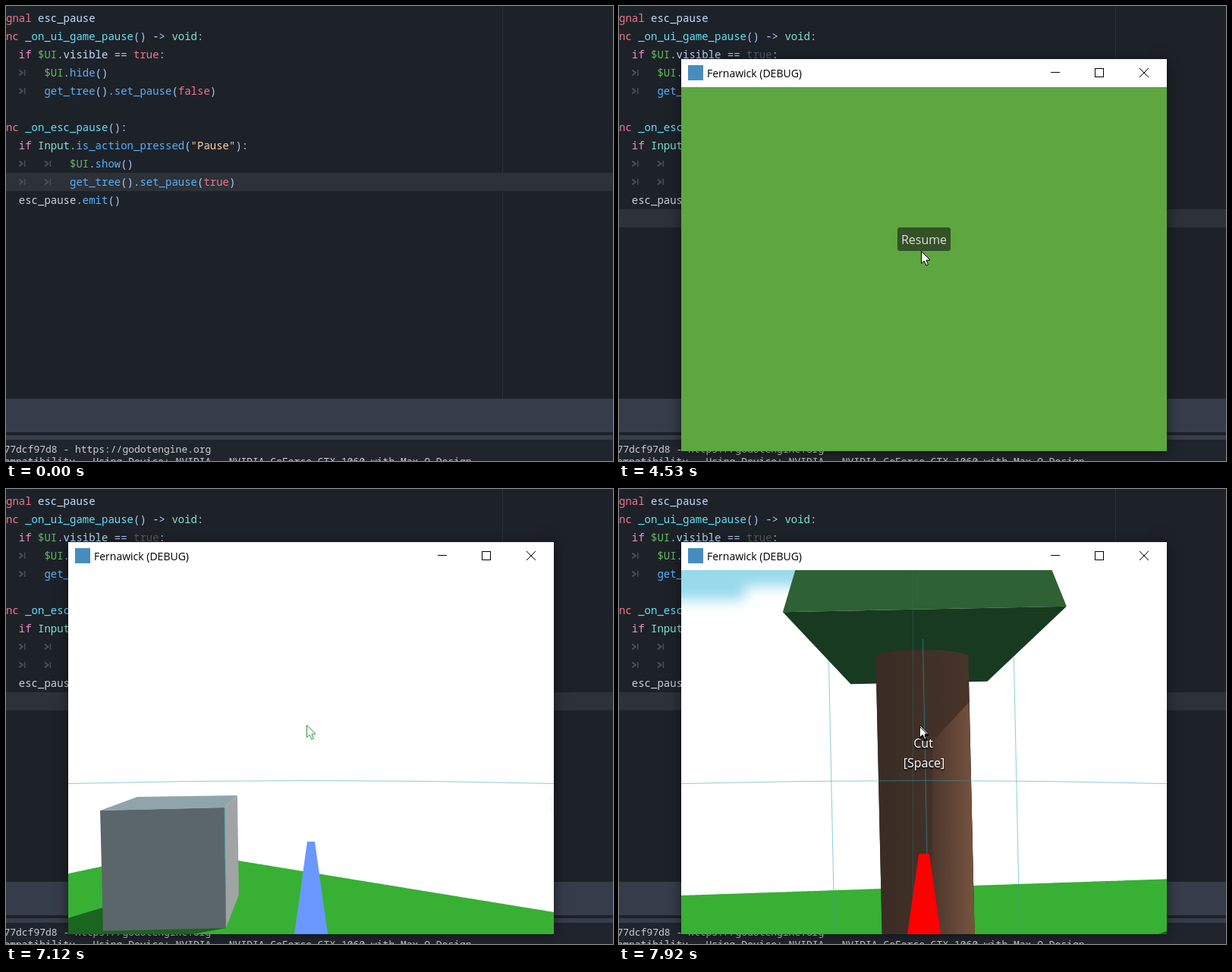
Animation of 800 by 600 pixels, one loop 8000 ms. Source, as an HTML page with a canvas:

```html
<!DOCTYPE html>
<html>
<head>
<meta charset="utf-8">
<style>
html, body { margin: 0; width: 100%; height: 100%; overflow: hidden; background: #1d2229; }
canvas { display: block; }
</style>
</head>
<body>
<canvas id="stage" width="800" height="600"></canvas>
<script>
const ctx = document.getElementById('stage').getContext('2d');
const LOOP = 8000, RUN = 2770, READY = 3500, PLAY = 5480, SPIN = 6650;
const MONO = '"Noto Sans Mono", monospace', SANS = '"Open Sans", sans-serif';

const ink = {
  r: '#f2748a', c: '#f48cc4', f: '#66e0f8', k: '#57b0fa', g: '#63b95c',
  w: '#cdcfd2', s: '#abc9f5', m: '#bce0ff', v: '#80e5cc', q: '#ffd0a8'
};

// one entry per row; each token starts with its colour letter
const code = [
  'rsignal|m esc_pause',
  'rfunc|f _on_ui_game_pause|s() -> |vvoid|s:',
  '\tcif |g$UI|s.|mvisible|s == |rtrue|s:',
  '\t\tg$UI|s.|khide|s()',
  '\t\tkget_tree|s().|kset_pause|s(|rfalse|s)',
  '',
  'rfunc|f _on_esc_pause|s():',
  '\tcif |vInput|s.|kis_action_pressed|s(|q"Pause"|s):',
  '\t\t\tg$UI|s.|kshow|s()',
  '\t\t\tkget_tree|s().|kset_pause|s(|rtrue|s)',
  '\twesc_pause|s.|kemit|s()'
];

const clamp = u => Math.max(0, Math.min(1, u));
const smooth = u => u * u * (3 - 2 * u);

// eased straight move between two points
function glide(t, t0, t1, [x0, y0], [x1, y1]) {
  const u = smooth(clamp((t - t0) / (t1 - t0)));
  return [x0 + (x1 - x0) * u, y0 + (y1 - y0) * u];
}

function rect(color, x, y, w, h) {
  ctx.fillStyle = color;
  ctx.fillRect(x, y, w, h);
}

function poly(color, pts) {
  ctx.beginPath();
  pts.forEach(p => ctx.lineTo(...p));
  ctx.closePath();
  ctx.fillStyle = color;
  ctx.fill();
}

function line(color, pts, width = 1) {
  ctx.beginPath();
  pts.forEach(p => ctx.lineTo(...p));
  ctx.strokeStyle = color;
  ctx.lineWidth = width;
  ctx.stroke();
}

function label(str, x, y, color, font, align = 'left') {
  ctx.font = font;
  ctx.fillStyle = color;
  ctx.textAlign = align;
  ctx.fillText(str, x, y);
}

function tabMark(x, y) {
  line('#4a4f58', [[x, y - 3.5], [x + 4.5, y], [x, y + 3.5]], 2);
  line('#4a4f58', [[x + 7.5, y - 4], [x + 7.5, y + 4]], 1.5);
}

function editor(t) {
  rect('#1d2229', 0, 0, 800, 600);
  rect('#2d3138', 0, t < 450 ? 220 : 268, 800, 24);
  rect('#2b3037', 654, 0, 1, 518);
  code.forEach((text, row) => {
    const y = row * 24 + 16, body = text.trimStart(), depth = text.length - body.length;
    let x = -16.8 + depth * 33.6;
    for (let i = 1; i < depth; i++) tabMark(i * 33.6 - 16.3, y);
    for (const token of body.split('|')) {
      const str = token.slice(1), dim = t > RUN && row === 2 && str === 'true';
      label(str, x, y + 5, dim ? '#565b6b' : ink[token[0]], '14px ' + MONO);
      x += str.length * 8.4;
    }
  });
  rect('#363d4a', 0, 518, 800, 44);
  rect('#363d4a', 0, 566, 800, 6);
  rect('#20252d', 0, 572, 800, 28);
  if (t < 1150 || t >= 3650) {
    label('77dcf97d8 - https://godotengine.org', -2.6, 589, '#cdcfd2', '13px ' + MONO);
    label('ompatibility - Using Device: NVIDIA - NVIDIA GeForce GTX 1060 with Max-Q Design',
      -2.6, 605, '#cdcfd2', '13px ' + MONO);
  }
}

// ---- 3D view: points are given as screen places seen at a reference yaw ----
const FOCAL = 650, CX = 402, HORIZON = 340, RAD = Math.PI / 180;
const yawAt = t => .0795 * Math.max(0, t - SPIN) - 7.8e-5 * Math.max(0, t - 7620) ** 2;
const START = 0, BLOCK = yawAt(7120), TREE = yawAt(7920);

function turn([px, py], deg) {
  const c = Math.cos(deg * RAD), s = Math.sin(deg * RAD);
  const x = px - CX, z = FOCAL * c - x * s;
  return z > 50 && [CX + FOCAL * (x * c + FOCAL * s) / z, HORIZON + FOCAL * (py - HORIZON) / z];
}

// screen height of a straight ground edge whose normal points deg off the view
const edge = (k, deg, x) => 375 + k * (FOCAL * Math.cos(deg * RAD) + (x - CX) * Math.sin(deg * RAD));

// left and right end of a slightly tilted horizontal span
const span = (x, y, half) => [[x - half, y + half * .02], [x + half, y - half * .02]];

function game(t) {
  const yaw = yawAt(t);
  const show = (draw, color, ref, pts) => {
    const p = pts.map(q => turn(q, yaw - ref));
    if (p.every(Boolean)) draw(color, p);
    return p;
  };
  const face = (...a) => show(poly, ...a), wire = (...a) => show(line, ...a);
  const band = (color, ref, l, top, r, bottom) => face(color, ref, [[l, top], [r, top], [r, bottom], [l, bottom]]);

  // sky
  rect('#fff', 82, 107, 640, 480);
  ctx.filter = 'blur(9px)';
  face('#c5c5c5', START, [[272, 408], [325, 382], [450, 382], [450, 432], [325, 432]]);
  band('#c5c5c5', START, 405, 398, 700, 449);
  band('#c5c5c5', START, 640, 383, 800, 459);
  band('#98d9ea', TREE, 0, 0, 270, 128);
  band('#98d9ea', TREE, 0, 0, 165, 146);
  ctx.filter = 'none';

  // ground with two far edges
  const ground = [[722, 587], [82, 587]];
  for (let x = 82; x <= 722; x += 4)
    ground.push([x, Math.max(edge(.2335, yaw - 102.3, x), edge(.259, yaw + 1.6, x))]);
  poly('#37b034', ground);

  // stone block: corners a, b in front, c, d behind
  const a = [123, 424], b = [287, 420], c = [304, 404], d = [172, 406];
  const a2 = [127, 583], b2 = [289, 579], c2 = [306, 535];
  face('#1a651f', BLOCK, [[44, 577], [140, 548], b2, [0, 632], [-34, 629]]);
  face('#8fa5ab', BLOCK, [a, b, c, d]);
  face('#a0a4a4', BLOCK, [b, c, c2, b2]);
  face('#5a666a', BLOCK, [a, b, b2, a2]);
  wire('rgba(40,160,175,.7)', BLOCK, [b, b2]);

  // tree
  const teal = 'rgba(40,165,180,.55)';
  for (const x of [276, 520]) wire(teal, TREE, [[x, 222], [x + 8, 600]]);
  const crown = span(397, 50, 149), rim = span(402.5, 158.5, 187), base = span(395, 255.5, 90);
  face('#2e6134', TREE, [...crown, ...rim.reverse()]);
  face('#183a20', TREE, [...rim, ...base]);
  const [l, r, foot] = face('#3f2e26', TREE, [[338, 221], [460, 221], [469, 620], [347, 620]]);
  if (l && r && foot) {
    const bark = ctx.createLinearGradient(l[0], 0, foot[0], 0);
    bark.addColorStop(0, '#392c25');
    bark.addColorStop(1, '#48342a');
    const lit = ctx.createLinearGradient(l[0], 0, foot[0], 0);
    lit.addColorStop(.5, '#46322a');
    lit.addColorStop(1, '#77543f');
    face(bark, TREE, [[338, 221], [460, 221], [469, 620], [347, 620]]);
    ctx.beginPath();
    ctx.ellipse((l[0] + r[0]) / 2, (l[1] + r[1]) / 2, (r[0] - l[0]) / 2, 9, 0, 0, 7);
    ctx.fill();
    face(lit, TREE, [[461, 281], [413, 333], [411, 620], [469, 620]]);
  }
  wire(teal, TREE, [[400, 198], [408, 600]]);
  wire('rgba(30,120,125,.45)', TREE, [[387, 20], [387, 640]]);
  wire('#b4b4b4', START, [[419.5, 60], [419.5, 543]]);

  ctx.beginPath();
  ctx.moveTo(82, 388.5);
  ctx.quadraticCurveTo(CX, 380.5, 722, 388.5);
  ctx.strokeStyle = teal;
  ctx.stroke();

  // pointer rod, red while the tree is in reach
  const aimed = yaw > 89, top = aimed ? 481 : 465, half = aimed ? 7 : 5;
  poly(aimed ? '#f00' : '#6a98ff', [[CX - half, top], [CX + half, top], [424, 587], [380, 587]]);
  if (aimed) {
    ctx.shadowColor = '#000';
    ctx.shadowBlur = 2;
    label('Cut', 401, 341, '#fff', '16px ' + SANS, 'center');
    label('[Space]', 402, 367, '#fff', '16px ' + SANS, 'center');
    ctx.shadowBlur = 0;
  }
  arrow(396, 311, aimed ? '#222' : '#2e963a');
}

function menu(t) {
  rect('#5ea63f', 82, 107, 640, 480);
  const hover = t >= 4730 && t < 4940, down = t >= 4940 && t < 5010;
  ctx.fillStyle = down ? 'rgba(0,0,0,.6)' : hover ? 'rgba(57,57,57,.6)' : 'rgba(26,26,26,.6)';
  ctx.beginPath();
  ctx.roundRect(367, 292, 70, 31, 3);
  ctx.fill();
  label('Resume', CX, 314, hover || down ? '#f2f2f2' : '#dcdfd9', '16px ' + SANS, 'center');
}

function gameWindow(t) {
  const u = clamp((t - RUN) / 200), scale = 1 - .08 * (1 - u) ** 2;
  ctx.save();
  ctx.globalAlpha = u;
  ctx.translate(402, 328);
  ctx.scale(scale, scale);
  ctx.translate(-402, -328);
  ctx.shadowColor = 'rgba(0,0,0,.5)';
  ctx.shadowBlur = 16;
  ctx.shadowOffsetY = 2;
  rect('#242725', 82, 70, 640, 517);
  ctx.shadowColor = 'transparent';
  rect('#fff', 82, 70, 640, 37);

  line('#000', [[569, 87.5], [581, 87.5]]);
  ctx.strokeRect(627.5, 82.5, 11, 11);
  line('#000', [[686, 82], [698, 94]]);
  line('#000', [[698, 82], [686, 94]]);

  if (t < READY) {
    rect('#6f9fc0', 91, 80, 19, 15);
    rect('#f4f6f8', 92, 82, 17, 12);
    rect('#3f78a5', 94, 83, 7, 10);
  } else {
    rect('#478cbf', 91, 78, 20, 20);
    label('Fernawick (DEBUG)', 116, 94, '#000', '14px ' + SANS);
    ctx.beginPath();
    ctx.rect(82, 107, 640, 480);
    ctx.clip();
    (t < PLAY ? menu : game)(t);
  }
  ctx.restore();
}

// ---- pointers ----
function arrow(x, y, outline) {
  const shape = [[0, 0], [0, 16], [3.7, 12.6], [6.4, 18.6], [9, 17.5], [6.4, 11.7], [11.5, 11.5], [0, 0]]
    .map(([a, b]) => [x + a + .5, y + b + .5]);
  poly('#fff', shape);
  line(outline, shape);
}

function beam([x, y]) {
  line('#d8dade', [[x, y - 8], [x, y + 8]]);
  for (const end of [y - 8, y + 8]) line('#d8dade', [[x - 3, end], [x + 3, end]]);
}

function spinner(x, y, t) {
  const ring = (color, from, to) => {
    ctx.beginPath();
    ctx.arc(x, y, 7.8, from, to);
    ctx.strokeStyle = color;
    ctx.lineWidth = 4.2;
    ctx.stroke();
  };
  ring('#2d93ea', 0, 7);
  ring('#3ba4f4', t / 160, t / 160 + 2);
}

function pointer(t) {
  if (t >= 600 && t < 970) beam(glide(t, 600, 730, [152, 329], [652, 415]));
  else if (t >= 970 && t < 1320) beam(glide(t, 970, 1320, [652, 421], [786, 610]));
  else if (t >= 1740 && t < RUN) {
    const [x, y] = glide(t, 1740, 2430, [8, 212], [508, 121]);
    beam([x, y - 100 * Math.sin(Math.PI * (x - 8) / 500)]);
  }
  else if (t >= RUN && t < 3940) spinner(508, 127, t);
  else if (t >= 3940 && t < PLAY) arrow(...glide(t, 4100, 4530, [494, 102], [398, 323]), '#000');
}

function frame() {
  const t = performance.now() % LOOP;
  editor(t);
  if (t >= RUN) gameWindow(t);
  pointer(t);
  requestAnimationFrame(frame);
}
frame();
</script>
</body>
</html>
```
